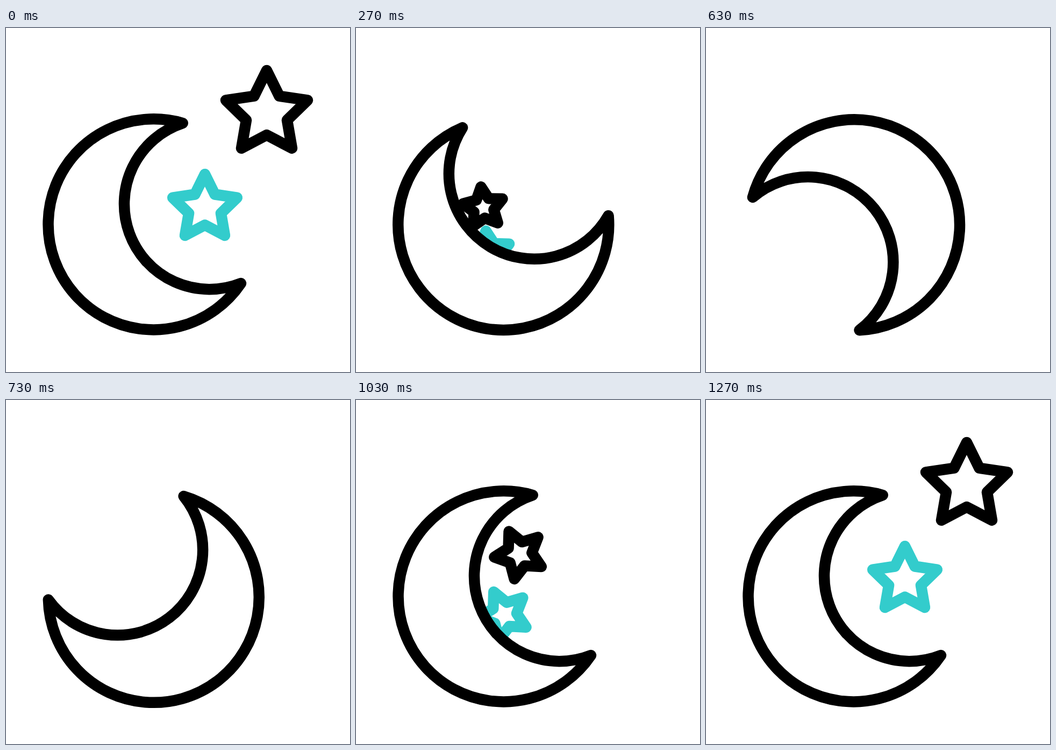
An HTML page without scripts that plays this animation: 640x640 px, repeating every 1.67 s.

```html
<!DOCTYPE html>
<html lang="en">
<head>
<meta charset="utf-8">
<title>Moon and stars</title>
<style>
  /* Clock in ticks, 50 per loop; every pose is computed from it */
  @property --tick { syntax: "<number>"; inherits: true; initial-value: 0; }
  @keyframes clock { from { --tick: 0; } to { --tick: 50; } }

  html, body { margin: 0; width: 100%; height: 100%; overflow: hidden; background: #fff; }
  svg {
    display: block;
    width: 100%;
    height: 100%;
    animation: clock 1670ms steps(50) -6ms infinite;
  }
  svg * { stroke-width: 20.5px; stroke-linecap: round; stroke-linejoin: round; }

  /* Swings back, then makes a full turn, both with smoothstep easing */
  .moon {
    --back: clamp(0, var(--tick) / 9.4, 1);
    --turn: clamp(0, (var(--tick) - 9.4) / 19.08, 1);
    fill: #fff;
    stroke: #000;
    transform-origin: 275.2px 366px;
    rotate: calc(-41.4deg * var(--back) * var(--back) * (3 - 2 * var(--back))
               + 401.4deg * var(--turn) * var(--turn) * (3 - 2 * var(--turn)));
  }

  /* --p: 0 = at rest in the sky, 1 = tucked behind the moon */
  .star {
    --away: min(var(--tick) / 12.25, (38 - var(--tick)) / 13.5);
    --s: clamp(0, var(--away), 1);
    --p: calc(var(--s) * var(--s) * (3 - 2 * var(--s)));
    --path: calc(var(--p) * (1 + var(--bend) * (1 - var(--p))));
    fill: none;
    opacity: calc(1000 * (1 - var(--away)));
    translate: calc(var(--x) + var(--dx) * var(--path)) calc(var(--y) + var(--dy) * var(--path));
    rotate: calc(90deg * var(--p));
    scale: calc(var(--size) * (1 - var(--shrink) * var(--p) + var(--settle) * var(--p) * var(--p)));
  }
  .black {
    --x: 485px; --y: 159px; --dx: -343px; --dy: 242.6px; --bend: 0;
    --size: 1; --shrink: .983; --settle: .378;
    stroke: #000;
  }
  .teal {
    --x: 370px; --y: 335px; --dx: -159px; --dy: 109px; --bend: .263;
    --size: .7875; --shrink: .556; --settle: .138;
    stroke: #33cccc;
  }
</style>
</head>
<body>
<svg viewBox="0 0 640 640">
  <defs>
    <path id="star" vector-effect="non-scaling-stroke"
      d="M0-80 23.5-32.4 76-24.7 38 12.4 47 64.7 0 40-47 64.7-38 12.4-76-24.7-23.5-32.4Z"/>
  </defs>
  <use class="star teal" href="#star"/>
  <use class="star black" href="#star"/>
  <path class="moon" d="M328.7 177A196 196 0 1 0 437 475A158.6 158.6 0 1 1 328.7 177Z"/>
</svg>
</body>
</html>
```
